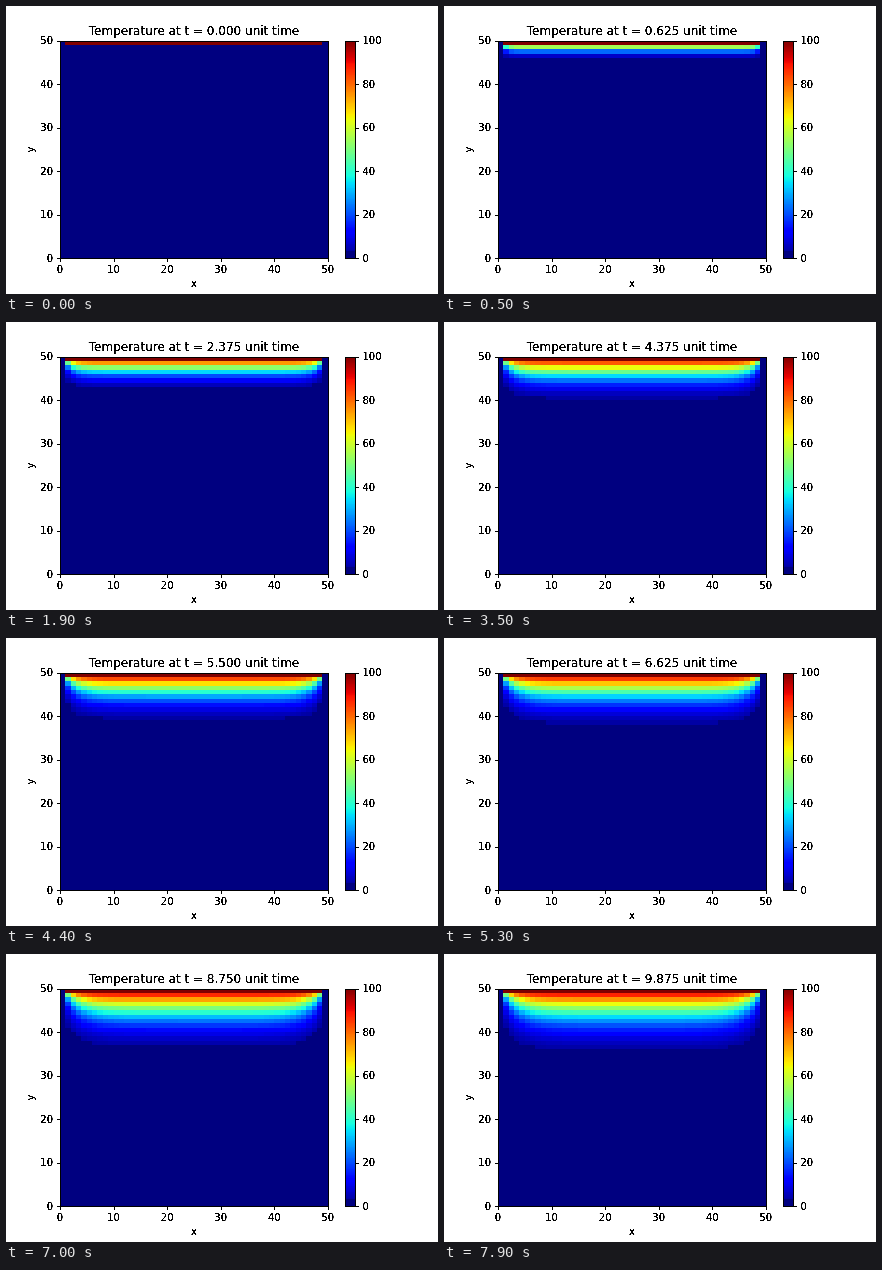
These frames come from a looping animation (432 by 288 pixels, 8000 ms). An HTML page with a canvas:

```html
<!DOCTYPE html>
<html lang="en">
<head>
<meta charset="utf-8">
<title>Heat equation</title>
<style>
  html, body { margin: 0; width: 100%; height: 100%; overflow: hidden; background: #fff; }
  canvas, svg { position: absolute; left: 0; top: 0; width: 432px; height: 288px; }
  text { font: 10px "DejaVu Sans", sans-serif; fill: #000; }
  #title { font-size: 12px; }
  .mid { text-anchor: middle; }
  .end { text-anchor: end; }
  path { fill: none; stroke: #000; shape-rendering: crispEdges; }
</style>
</head>
<body>
<canvas id="plot" width="432" height="288"></canvas>
<svg id="axes" width="432" height="288" viewBox="0 0 432 288">
  <!-- hardens the glyph edges -->
  <filter id="crisp" filterUnits="userSpaceOnUse" x="0" y="0" width="432" height="288">
    <feComponentTransfer><feFuncA type="linear" slope="5" intercept="-1.2"/></feComponentTransfer>
  </filter>
  <path id="lines"/>
  <g id="labels" filter="url(#crisp)">
    <text id="title" class="mid" x="188" y="29"></text>
    <text class="mid" x="188" y="281">x</text>
    <text class="mid" transform="translate(28 143.5) rotate(-90)">y</text>
  </g>
</svg>
<script>
const N = 50, STEPS = 80, STEP_MS = 100, DT = 0.125;
const LEFT = 54, RIGHT = 321.84, TOP = 34.56, BOTTOM = 252;
const BAR_LEFT = 339, BAR_RIGHT = 349;

const ctx = document.getElementById('plot').getContext('2d');
const title = document.getElementById('title');
const labels = document.getElementById('labels');

// Piecewise linear channels of the jet colour map
const JET = [
  [[0, 0], [0.35, 0], [0.66, 1], [0.89, 1], [1, 0.5]],
  [[0, 0], [0.125, 0], [0.375, 1], [0.64, 1], [0.91, 0], [1, 0]],
  [[0, 0.5], [0.11, 1], [0.34, 1], [0.65, 0], [1, 0]]
];

function channel(stops, v) {
  const i = Math.max(1, stops.findIndex(s => v <= s[0]));
  const [x0, y0] = stops[i - 1], [x1, y1] = stops[i];
  return Math.round(255 * (y0 + (y1 - y0) * (v - x0) / (x1 - x0)));
}

const colours = Array.from({ length: 256 }, (_, i) => {
  const v = i < 8 ? 0 : i / 255; // the coldest levels share one colour
  return `rgb(${JET.map(stops => channel(stops, v))})`;
});

const colourOf = temp => colours[Math.min(255, Math.floor(temp * 2.56))];

// Row 0 is the hot top edge; the other edges stay at zero
function startGrid() {
  const grid = new Float64Array(N * N);
  grid.fill(100, 1, N - 1);
  return grid;
}

function diffuse(grid) {
  const next = grid.slice();
  for (let r = 1; r < N - 1; r++) {
    for (let c = 1; c < N - 1; c++) {
      const i = r * N + c;
      next[i] = (grid[i - 1] + grid[i + 1] + grid[i - N] + grid[i + N]) / 4;
    }
  }
  return next;
}

const grids = [startGrid()];
while (grids.length < STEPS) grids.push(diffuse(grids[grids.length - 1]));

const edgeX = i => Math.round(LEFT + (RIGHT - LEFT) * i / N);
const edgeY = i => Math.round(TOP + (BOTTOM - TOP) * i / N);

function drawField(grid) {
  for (let r = 0; r < N; r++) {
    for (let c = 0; c < N; c++) {
      const x = edgeX(c), y = edgeY(r);
      ctx.fillStyle = colourOf(grid[r * N + c]);
      ctx.fillRect(x, y, edgeX(c + 1) - x, edgeY(r + 1) - y);
    }
  }
}

function drawBar() {
  for (let y = 35; y < 252; y++) {
    ctx.fillStyle = colourOf(100 * (BOTTOM - y - 0.5) / (BOTTOM - TOP));
    ctx.fillRect(BAR_LEFT, y, BAR_RIGHT - BAR_LEFT + 1, 1);
  }
}

function addLabel(text, x, y, cls) {
  const el = document.createElementNS('http://www.w3.org/2000/svg', 'text');
  el.setAttribute('x', x);
  el.setAttribute('y', y);
  el.setAttribute('class', cls);
  el.textContent = text;
  labels.append(el);
}

function drawAxes() {
  let d = 'M54.5 35.5H322.5V252.5H54.5ZM339.5 35.5H349.5V252.5H339.5Z';
  for (let i = 0; i <= 5; i++) {
    const x = LEFT + (RIGHT - LEFT) * i / 5;
    const y = BOTTOM - (BOTTOM - TOP) * i / 5;
    const tx = Math.round(x) + 0.5, ty = Math.round(y) + 0.5;
    const base = Math.round(y + 3.8);
    d += `M${tx} 253v3M51 ${ty}h3M350 ${ty}h3`;
    addLabel(i * 10, x, 267, 'mid');
    addLabel(i * 10, 47, base, 'end');
    addLabel(i * 20, 356.5, base, '');
  }
  document.getElementById('lines').setAttribute('d', d);
}

let shown = -1;
function show(step) {
  if (step === shown) return;
  shown = step;
  drawField(grids[step]);
  title.textContent = `Temperature at t = ${(step * DT).toFixed(3)} unit time`;
}

drawBar();
drawAxes();
show(0);

const start = performance.now();
function tick() {
  show(Math.floor((performance.now() - start) / STEP_MS) % STEPS);
  requestAnimationFrame(tick);
}
requestAnimationFrame(tick);
</script>
</body>
</html>
```
